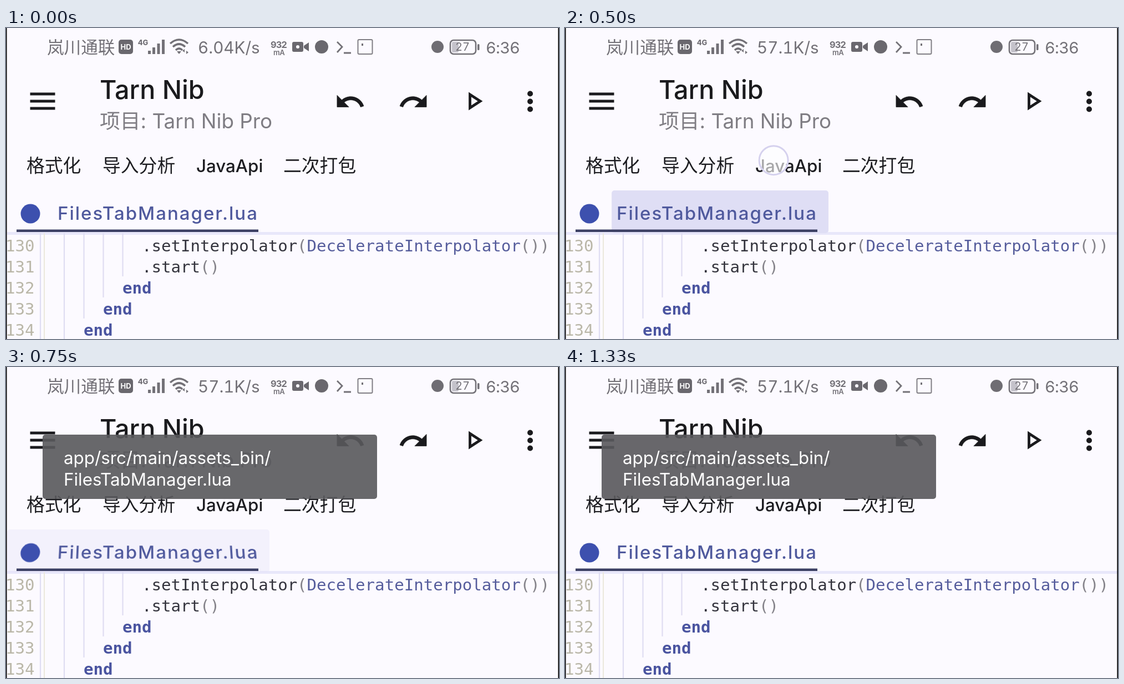
Recreate the animation shown at these times as an HTML page. Size 997 by 561 pixels, loop 1350 ms.

```html
<!DOCTYPE html>
<html lang="zh-CN">
<head>
<meta charset="utf-8">
<title>Tab swipe</title>
<style>
html, body { margin: 0; width: 100%; height: 100%; overflow: hidden; background: #fcfaff; }
#stage { position: relative; width: 997px; height: 561px; max-width: 100%; max-height: 100%; overflow: hidden; contain: strict; }
svg { position: absolute; left: 0; top: 0; width: 997px; height: 561px; display: block; }
text { font-family: Inter, "Noto Sans CJK SC", "Noto Sans CJK", sans-serif; white-space: pre; }
#tab { left: 2px; top: 293px; width: 473px; height: 77px; transform-origin: 50% 51%; }
.status { fill: #737177; font-variant-numeric: tabular-nums; }
.menu { fill: #1d1d21; font-size: 32.8px; font-weight: 500; }
.code text { font: 29.1px "DejaVu Sans Mono", "Noto Sans Mono", monospace; fill: #34343d; }
.code .num { fill: #bab7a8; }
.code .key { fill: #4a54a0; font-weight: 700; }
.code .type { fill: #565d9c; }
.code .par { fill: #85838a; }
</style>
</head>
<body>
<div id="stage">
<svg viewBox="0 0 997 561">
  <rect width="997" height="561" fill="#fcfaff"/>

  <g class="status">
    <text x="74" y="46" font-size="30.6">岚川通联</text>
    <rect x="203" y="21" width="26" height="26" rx="5" fill="#6a686e"/>
    <text x="216" y="39" font-size="13" font-weight="700" text-anchor="middle" fill="#fff">HD</text>
    <text x="238" y="31" font-size="13" font-weight="800">4G</text>
    <path d="M256 41h5v6h-5zM264 35h5v12h-5zM272.500 28h5v19h-5zM281 21h5v26h-5z"/>
    <g fill="none" stroke="#737177" stroke-width="3.600">
      <path d="M296 28Q312 14 328 28M301 34Q312 24 323 34M306 40Q312 34 318 40"/>
    </g>
    <path d="M308 42h8l-4 5zM318 41l4-3v6zM329 44l-4-3v6z"/>
    <text id="speed" x="346" y="46" font-size="29.6">6.04K/s</text>
    <text x="477" y="36" font-size="16.500" font-weight="700" letter-spacing="-1">932</text>
    <text x="482" y="49" font-size="13" font-weight="600" letter-spacing="-.5">mA</text>
    <path d="M519 25h14q3 0 3 3v12q0 3-3 3h-14q-3 0-3-3v-12q0-3 3-3zM537 32l9-6v16l-9-6z" fill="#6a686e"/>
    <circle cx="526" cy="34" r="3" fill="#fcfaff"/>
    <circle cx="569" cy="34" r="12" fill="#6a686e"/>
    <path d="M597 25l9 9-9 10M609 45h13" fill="none" stroke="#737177" stroke-width="2.800"/>
    <rect x="634.500" y="21" width="26" height="26" rx="2" fill="none" stroke="#807e84" stroke-width="2"/>
    <rect x="641" y="28" width="3" height="4"/>
    <circle cx="778" cy="34" r="11" fill="#6f6d73"/>
    <rect x="804" y="25" width="12" height="19" rx="2" fill="#c4c2ca"/>
    <rect x="801" y="22" width="46" height="25" rx="6" fill="none" stroke="#737177" stroke-width="2.600"/>
    <rect x="850" y="29" width="3.500" height="11" rx="1.500"/>
    <text x="823" y="41" font-size="20" text-anchor="middle">27</text>
    <text x="865" y="46" font-size="29" letter-spacing="-.8">6:36</text>
  </g>

  <g fill="#1a1a1d">
    <path d="M43.500 116.500h45v5h-45zM43.500 129.500h45v5h-45zM43.500 142.500h45v5h-45z"/>
    <text x="169" y="128" font-size="46.700" font-weight="500">Tarn Nib</text>
    <text x="169" y="181" font-size="36.800" fill="#7f7d83">项目: Tarn Nib Pro</text>
    <path id="undo" stroke="#1a1a1d" stroke-width=".35" transform="translate(592.300 105.100) scale(2.340)" d="M12.500 8c-2.650 0-5.050 1-6.900 2.600L2 7v9h9l-3.620-3.620c1.390-1.160 3.160-1.880 5.120-1.880 3.540 0 6.550 2.310 7.600 5.500l2.370-.78C21.080 11.030 17.150 8 12.500 8z"/>
    <use href="#undo" transform="translate(1355 0) scale(-1 1)"/>
    <path d="M836.500 120L855 132 836.500 144z" fill="none" stroke="#1a1a1d" stroke-width="4.800"/>
    <circle cx="945" cy="118.500" r="5"/>
    <circle cx="945" cy="132.500" r="5"/>
    <circle cx="945" cy="146.500" r="5"/>
  </g>

  <g class="menu">
    <text x="37" y="260">格式化</text>
    <text x="174" y="260">导入分析</text>
    <text x="343" y="260" style="font-size:31.300px">JavaApi</text>
    <text x="500" y="260">二次打包</text>
  </g>

  <rect x="2" y="368" width="995" height="5" fill="#e8e7fa"/>
  <rect id="ripple" y="293" height="77" rx="5" fill="#dfdef5"/>
  <rect x="19" y="363.500" width="436" height="4.500" fill="#3c4064"/>

  <path d="M62 370v191M105 370v191M140.500 370v154M175.500 370v116M210.500 370v78" stroke="#dfddf2" stroke-width="2.200"/>
  <path d="M69 370v191" stroke="#ebe8dc" stroke-width="2"/>
  <g class="code" id="code"></g>
</svg>

<svg id="tab" viewBox="2 293 473 77">
  <circle cx="44" cy="335" r="17.500" fill="#3d50ae"/>
  <text x="93" y="346" font-size="33" font-weight="500" letter-spacing="2" fill="#4f599d">FilesTabManager.lua</text>
</svg>

<svg viewBox="0 0 997 561">
  <g id="tip">
    <rect x="66" y="122" width="603" height="116" rx="5" fill="#5a5a5d" fill-opacity=".91"/>
    <g fill="#fff" font-size="31.300">
      <text x="104" y="175">app/src/main/assets_bin/</text>
      <text x="104" y="214">FilesTabManager.lua</text>
    </g>
  </g>
  <circle id="touch" r="26" fill="#fff" fill-opacity=".62" stroke="#d5d1ee" stroke-width="3"/>
  <path d="M.7 0v561M996.200 0v561" stroke="#000" stroke-width="1.600"/>
</svg>
</div>

<script>
const LOOP = 1350;
const CELL = 17.5;
const $ = id => document.getElementById(id);

// Each line: left edge, then [class, text] runs.
const lines = [
  [245, ['', '.setInterpolator'], ['par', '('], ['type', 'DecelerateInterpolator'], ['par', '())']],
  [245, ['', '.start'], ['par', '()']],
  [210, ['key', 'end']],
  [175, ['key', 'end']],
  [140, ['key', 'end']]
];

$('code').innerHTML = lines.map(([left, ...runs], i) => {
  const put = (x, cls, s) => `<text class="${cls}" x="${x}" y="${403 + i * 38}">${s}</text>`;
  let x = left;
  return put(-1, 'num', 130 + i) + runs.map(([cls, s]) => {
    const out = put(x, cls, s);
    x += s.length * CELL;
    return out;
  }).join('');
}).join('');

// Piecewise linear track of [time, value] steps.
function track(steps, t) {
  if (t <= steps[0][0]) return steps[0][1];
  for (let i = 1; i < steps.length; i++) {
    const [t0, a] = steps[i - 1], [t1, b] = steps[i];
    if (t < t1) return a + (b - a) * (t - t0) / (t1 - t0);
  }
  return steps[steps.length - 1][1];
}

const touchX = [[455, 352], [500, 375.5], [620, 451]];
const touchY = [[455, 333], [500, 240.5], [620, 21]];
const touchAlpha = [[440, 0], [455, 1], [660, 1], [690, 0.65], [750, 0]];
const rippleLeft = [[460, 300], [500, 87], [530, 2]];
const rippleRight = [[460, 405], [490, 475]];
const rippleAlpha = [[455, 0], [480, 1], [650, 1], [800, 0]];
const tipAlpha = [[624, 0], [705, 1]];
const tilt = [[515, 0], [615, 56]];

// The tab tilts with the drag, then decelerates back to flat.
function tiltAt(t) {
  const k = Math.min(1, Math.max(0, (t - 680) / 140));
  return track(tilt, t) * (1 - k) ** 2;
}

function draw(t) {
  $('speed').textContent = t < 390 ? '6.04K/s' : '57.1K/s';

  const touch = $('touch');
  touch.setAttribute('cx', track(touchX, t));
  touch.setAttribute('cy', track(touchY, t));
  touch.style.opacity = track(touchAlpha, t);

  const left = track(rippleLeft, t);
  const ripple = $('ripple');
  ripple.setAttribute('x', left);
  ripple.setAttribute('width', track(rippleRight, t) - left);
  ripple.style.opacity = track(rippleAlpha, t);

  const angle = tiltAt(t);
  $('tab').style.transform = angle ? `perspective(600px) rotateX(${angle}deg)` : 'none';
  $('tip').style.opacity = track(tipAlpha, t);
}

function tick() {
  draw(performance.now() % LOOP);
  requestAnimationFrame(tick);
}
tick();
</script>
</body>
</html>
```
